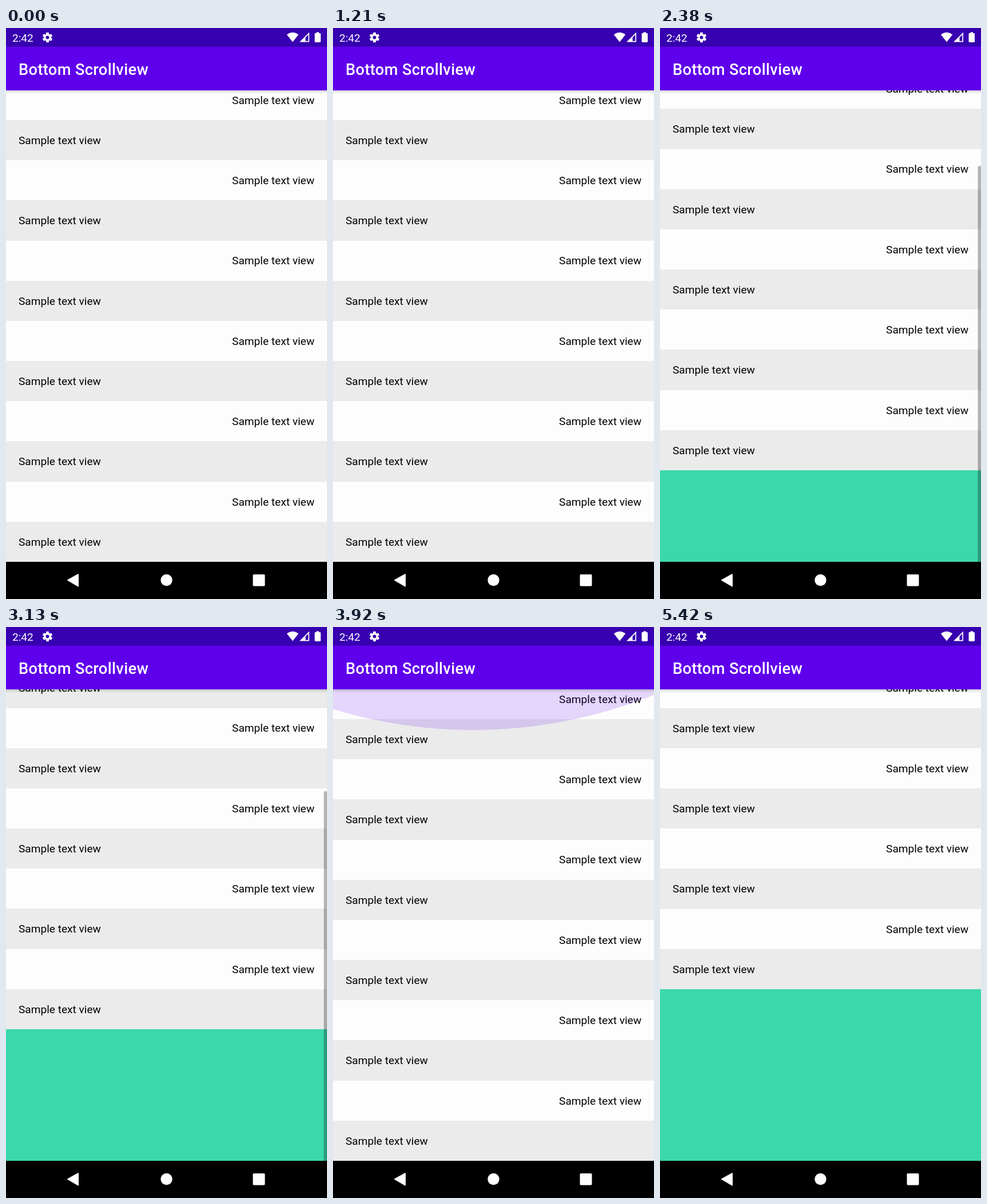
These frames come from a looping animation (561 by 998 pixels, 5.46 s). An HTML page with a canvas:

```html
<!DOCTYPE html>
<html lang="en">
<head>
<meta charset="utf-8">
<title>Bottom Scrollview</title>
<style>
html, body { margin: 0; width: 100%; height: 100%; overflow: hidden; background: #000; }
canvas { display: block; }
</style>
</head>
<body>
<canvas id="stage" width="561" height="998"></canvas>
<script>
const ctx = document.getElementById('stage').getContext('2d');
const W = 561, TOP = 109, BOTTOM = 933, VIEW = BOTTOM - TOP;
const ROW = 70.18, LOOP = 5460;

// [start, end, from, to]: height of the green area under the list
const moves = [
  [1900, 2340, 0, 160],
  [2680, 3090, 160, 230],
  [3560, 3790, 230, 0],
  [4170, 4420, 0, 258.5],
  [4500, 4680, 258.5, 300]
];

const clamp = v => Math.max(0, Math.min(1, v));
const ramp = (t, a, b) => clamp((t - a) / (b - a));
const smooth = k => k * k * (3 - 2 * k);

function gapAt(t) {
  let gap = 0;
  for (const [a, b, from, to] of moves)
    if (t >= a) gap = from + (to - from) * smooth(ramp(t, a, b));
  return gap;
}

function box(x, y, w, h, color) {
  ctx.fillStyle = color;
  ctx.fillRect(x, y, w, h);
}

function roundBox(x, y, w, h, r) {
  ctx.beginPath();
  ctx.roundRect(x, y, w, h, r);
  ctx.fill();
}

function shape(...points) {
  ctx.beginPath();
  points.forEach(p => ctx.lineTo(...p));
  ctx.closePath();
}

function disc(x, y, r) {
  ctx.beginPath();
  ctx.arc(x, y, r, 0, 7);
  ctx.fill();
}

function label(text, x, y, size, color, weight = 400, align = 'left') {
  ctx.font = `${weight} ${size}px Roboto, sans-serif`;
  ctx.textAlign = align;
  ctx.fillStyle = color;
  ctx.fillText(text, x, y);
}

function drawList(gap) {
  const end = BOTTOM - gap;
  box(0, TOP, W, VIEW, '#fdfdfd');
  for (let i = 0, y = end - ROW; y > TOP - ROW; i++, y -= ROW) {
    const odd = i % 2;
    const top = Math.round(y);
    if (!odd) box(0, top, W, Math.round(y + ROW) - top, '#ebebeb');
    label('Sample text view', odd ? 539 : 22, Math.round(y + ROW / 2 + 6.8), 19.1, '#000', 400, odd ? 'right' : 'left');
  }
  box(0, Math.round(end), W, BOTTOM - Math.round(end), '#3bd8ab');
}

function drawScrollbar(t, gap) {
  const alpha = 0.29 * (1 - ramp(t, 4980, 5230));
  if (gap < 1 || !alpha) return;
  const size = VIEW * VIEW / (VIEW + gap);
  box(555.5, BOTTOM - size - 1.5, 5.5, size + 1.5, `rgba(0,0,0,${alpha})`);
}

function drawGlow(t) {
  const pull = smooth(ramp(t, 3770, 3910));
  const fade = 1 - ramp(t, 3960, 4160);
  if (!pull || !fade) return;
  const r = W * 1.5;
  ctx.save();
  ctx.translate(0, TOP);
  ctx.scale(1, pull * fade);
  ctx.fillStyle = `rgba(98,0,238,${0.155 * pull * fade})`;
  disc(245, 71 - r, r);
  ctx.restore();
}

function drawGear(x, y) {
  ctx.save();
  ctx.translate(x, y);
  ctx.fillStyle = '#fff';
  for (let i = 0; i < 6; i++) {
    roundBox(-2.4, -8.7, 4.8, 5, 0.8);
    ctx.rotate(Math.PI / 3);
  }
  disc(0, 0, 6.4);
  ctx.fillStyle = '#3700b0';
  disc(0, 0, 2.9);
  ctx.restore();
}

function drawStatusBar() {
  box(0, 0, W, 32.5, '#3700b0');
  label('2:42', 11, 24, 19.1, '#fff');
  drawGear(72.5, 16.5);
  ctx.fillStyle = '#fff';
  // wifi
  ctx.beginPath();
  ctx.moveTo(501, 24.5);
  ctx.lineTo(490.8, 11.6);
  ctx.quadraticCurveTo(501, 4, 511.2, 11.6);
  ctx.closePath();
  ctx.fill();
  // signal
  shape([513, 24.5], [530, 7.5], [530, 24.5]);
  ctx.fill();
  shape([523.5, 16.6], [528.3, 11.8], [528.3, 22.8], [523.5, 22.8]);
  ctx.fillStyle = '#3700b0';
  ctx.fill();
  // battery
  ctx.fillStyle = '#fff';
  roundBox(539.5, 9, 10.5, 16, 1.4);
  ctx.fillRect(542.5, 7.3, 4.5, 2.5);
}

function drawToolbar() {
  const shade = ctx.createLinearGradient(0, TOP, 0, TOP + 6);
  shade.addColorStop(0, 'rgba(0,0,0,.15)');
  shade.addColorStop(1, 'rgba(0,0,0,0)');
  box(0, TOP, W, 6, shade);
  box(0, 32.5, W, TOP - 32.5, '#5f00ec');
  ctx.letterSpacing = '0.34px';
  label('Bottom Scrollview', 22, 81.5, 27.28, '#fff', 500);
  ctx.letterSpacing = '0px';
}

function drawNavBar() {
  box(0, BOTTOM, W, 998 - BOTTOM, '#000');
  ctx.fillStyle = ctx.strokeStyle = '#fff';
  ctx.lineWidth = 2;
  ctx.lineJoin = 'round';
  shape([108, 965], [126, 955], [126, 975.5]);
  ctx.fill();
  ctx.stroke();
  disc(280.5, 965, 10.2);
  roundBox(431.5, 955, 21, 20.5, 1.8);
}

function frame(now) {
  const t = now % LOOP;
  const gap = gapAt(t);
  drawList(gap);
  drawScrollbar(t, gap);
  drawGlow(t);
  drawToolbar();
  drawStatusBar();
  drawNavBar();
  requestAnimationFrame(frame);
}

frame(0);
</script>
</body>
</html>
```
